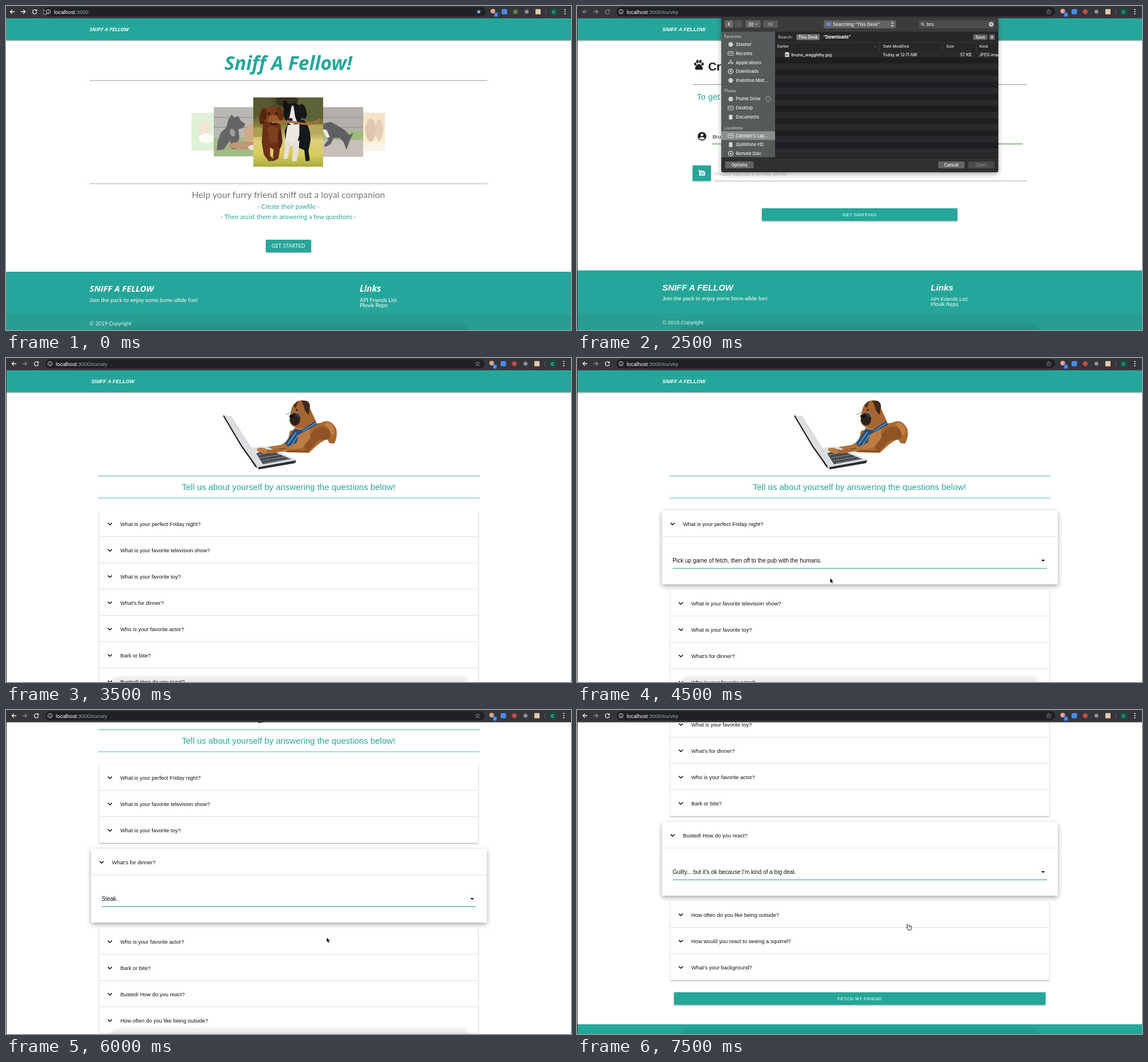
Animation, 987 px wide and 567 px high, one loop 8000 ms. Source, as an HTML page:

```html
<!DOCTYPE html>
<html lang="en">
<head>
<meta charset="utf-8">
<title>Sniff A Fellow</title>
<style>
html, body { margin: 0; width: 100%; height: 100%; overflow: hidden; background: #fff; }
#stage { display: block; width: 987px; height: 567px; font-family: "Liberation Sans", Arial, sans-serif; }
.lato { font-family: Lato, sans-serif; }
.lato .brand { font-family: "Open Sans", sans-serif; font-variant-ligatures: none; }
.mac { font-family: Inter, sans-serif; font-weight: 500; }
.brand { font-weight: 700; font-style: italic; }
.caps { letter-spacing: .35px; }
.low { filter: drop-shadow(0 1px 1.3px rgba(0,0,0,.36)); }
.high { filter: drop-shadow(0 3px 4px rgba(0,0,0,.34)); }
.blur { filter: blur(2.5px); }
</style>
</head>
<body>
<svg id="stage" viewBox="0 0 987 567"></svg>
<script>
const TEAL = '#26a69a', INK = '#212121';

// y of text is the middle of its capitals
const text = (s, x, y, size, fill = INK, more = '') =>
  `<text x="${x}" y="${y}" dy=".36em" font-size="${size}" fill="${fill}" ${more}>${s}</text>`;
const rect = (x, y, w, h, fill, more = '') =>
  `<rect x="${x}" y="${y}" width="${w}" height="${h}" fill="${fill}" ${more}/>`;
const dot = (x, y, r, fill, more = '') => `<circle cx="${x}" cy="${y}" r="${r}" fill="${fill}" ${more}/>`;
const oval = (x, y, rx, ry, fill, turn = 0) =>
  `<ellipse rx="${rx}" ry="${ry}" fill="${fill}" transform="translate(${x} ${y}) rotate(${turn})"/>`;
const shape = (d, fill, more = '') => `<path d="${d}" fill="${fill}" ${more}/>`;
const line = (d, color, w = 1, more = '') => shape(d, 'none', `stroke="${color}" stroke-width="${w}" ${more}`);
const at = (x, y, inner) => `<g transform="translate(${x} ${y})">${inner}</g>`;
const group = (cls, inner) => `<g class="${cls}">${inner}</g>`;
const MID = 'text-anchor="middle"', BRAND = 'class="brand"', BOLD = 'font-weight="700"';

const arrow = (x, y) => at(x, y, shape('M0 0V8.6L2 6.9 3.4 10 5 9.3 3.6 6.3H6.3Z', '#000', 'stroke="#fff" stroke-width=".6"'));
const hand = (x, y) => at(x, y, shape(
  'M-4-4.5Q-2.5-5.6-1.4-3.6L-.6-2.2 3-2Q4.8-1.6 4.6.6L4 3.4 3.4 5H-1.4L-2.4 3-4.4 1Q-4.6-.6-2.4.2Z',
  '#fff', 'stroke="#222" stroke-width="1"') + line('M.4-1.8V.6M2.2-1.8V.6', '#222', .7));

function chrome(path, dim) {
  const home = !path, l = home ? 0 : 3, r = home ? 0 : -2;
  const on = dim ? '#85888b' : '#f1f1f1';
  const back = (x, flip, c) => `<g transform="translate(${x} 10) scale(${flip} 1)">${line('M4 0H-3.6M0-3.6L-3.6 0 0 3.6', c, 1.3)}</g>`;
  return rect(0, 0, 987, 21.5, '#35363a') + rect(66 + l, 2, 772 + r - l, 16, '#202124', 'rx="8"') +
    back(11 + l, 1, on) + back(30 + l, -1, home ? on : '#85888b') +
    at(50 + l, 10, line('M3-2.2A3.7 3.7 0 1 0 3.7 1', on, 1.3) + shape('M4.2-4.4V-.8H.6Z', on)) +
    dot(74 + l, 10, 3.8, 'none', 'stroke="#ddd" stroke-width=".9"') + rect(73.5 + l, 9.4, 1, 3, '#ddd') + rect(73.5 + l, 7.6, 1, 1, '#ddd') +
    text(`localhost<tspan fill="#9aa0a6">:3000${path}</tspan>`, 84 + l, 10.3, 9.3, '#fff') +
    text(home ? '★' : '☆', 826 + r, 9.6, 12, home ? '#8ab4f8' : '#fff', MID + ' font-family="DejaVu Sans, sans-serif"') +
    dot(850.5 + r, 9, 4, '#e8a48f') + rect(852.5 + r, 11, 7, 8, '#2f6fe0', 'rx="1.5"') +
    text('1', 856 + r, 15.2, 6, '#fff', MID) +
    rect(866 + r, 5.5, 9.5, 9, '#4a8cf7', 'rx="2"') +
    dot(890 + r, 10, 4.2, home ? '#5f7d4e' : '#c0504a') + dot(909.5 + r, 10, 3.5, '#8d8f92') +
    rect(925 + r, 5.5, 9, 9, '#e9c9ad') + rect(942.5 + r, 5, 1, 10, '#5c5f63') +
    dot(957 + r, 10, 6.5, '#0d5548') + text('C', 957 + r, 10, 7.5, '#dfe', MID) +
    [6.3, 10, 13.7].map(y => dot(976.5 + r, y, 1.1, '#eee')).join('');
}

const nav = x => group('low', rect(0, 21, 987, 39, TEAL)) + text('SNIFF A FELLOW', x, 41, 9.1, '#fff', BRAND);
const button = (x, y, w, label, size = 8) =>
  group('low', rect(x, y, w, 22, TEAL, 'rx="1"')) + text(label, x + w / 2, y + 11, size, '#fff', MID + ' class="caps"');
const footer = (y, x, small) => rect(0, y, 987, 120, TEAL) + rect(0, y + 75, 987, 60, '#289d93') +
  text('SNIFF A FELLOW', x, y + 30, 14.9, '#fff', BRAND) + text('Links', 618, y + 30, 15.1, '#fff', BRAND) +
  text('Join the pack to enjoy some bone-afide fun!', x, y + 49, small + .4, '#fff') +
  text('API Friends List', 618, y + 49.6, small, '#fff') + text('Plovik Repo', 618, y + 58.6, small, '#fff') +
  text('© 2019 Copyright', x, y + 90.5, 9.2, '#e6f3f1');
const dock = rect(182, 557, 626, 30, '#000', 'rx="12" opacity=".07" class="blur"');
const edge = rect(0, 21, 1, 546, '#2b2f31');

const photo = (x, y, w, h, fade, inner) =>
  `<svg x="${x}" y="${y}" width="${w}" height="${h}" viewBox="0 0 100 100" preserveAspectRatio="none"><g opacity="${fade}">${inner}</g></svg>`;
const all = fill => rect(0, 0, 100, 100, fill);

function carousel() {
  const planks = [20, 40].map(y => rect(0, y, 100, 1.5, '#6e6a64')).join('');
  const farLeft = all('#a5dd92') + oval(34, 40, 15, 22, '#d9b98e', 20) + oval(40, 67, 20, 13, '#fff3e2') + oval(82, 48, 14, 24, '#e3d5b0');
  const farRight = all('#edcf7c') + rect(0, 0, 100, 45, '#e6b766') + oval(62, 45, 14, 30, '#a9672f') + oval(85, 45, 10, 28, '#b9793f') + rect(0, 78, 100, 22, '#f0e3c2');
  const left = all('#a09d98') + planks + rect(0, 62, 100, 38, '#7fa15a') +
    shape('M30 24L36 15 41 21 50 18 55 28 64 34 60 42 50 45 52 62 44 86 35 84 33 68 20 86 6 88 8 70 14 52 25 42Z', '#2a292d') +
    oval(38, 52, 5, 8, '#7c7a78', -20) + oval(80, 55, 19, 22, '#c08c58', 25) + oval(62, 78, 32, 8, '#a7733f') + oval(84, 82, 14, 6, '#e8d8bf');
  const right = all('#96928b') + planks + rect(0, 48, 100, 20, '#79a04c') + rect(0, 66, 100, 34, '#b3a79f') +
    shape('M14 40L22 32 34 30 46 36 62 46 72 56 80 52 74 64 70 74 66 86 60 70 52 62 40 62 34 74 24 80 20 77 29 66 25 56 14 49Z', '#232326') +
    shape('M16 44L26 46 32 60 26 62 20 52Z', '#e5e2df');
  const main = all('url(#meadow)') + oval(8, 8, 18, 18, '#58592e') + oval(84, 14, 24, 20, '#5e6238') +
    oval(48, 5, 16, 9, '#34331f') + oval(92, 46, 24, 7, '#b5aa5c') + oval(6, 50, 12, 7, '#aaa050') +
    shape('M14 36Q27 28 39 40L42 64 38 74 36 88 28 92 29 75 24 72 24 84 31 91 22 92 15 82 12 64Z', '#6a3117') +
    shape('M20 44Q28 38 36 46L35 64 24 66Z', '#7d3f1e') + oval(38, 60, 3, 13, '#51230f') +
    oval(27, 25, 13, 12, '#7c3d1d') + oval(14, 27, 5, 12, '#57270f', 12) + oval(38, 24, 4.5, 11, '#67300f', -12) +
    oval(29, 32, 8, 6, '#9b5a2c') + oval(29, 37, 5, 3, '#3b180c') +
    shape('M50 36L72 32Q82 42 82 62L79 77 81 91 75 92 73 76 64 72 62 66 46 62 45 48Z', '#17181c') +
    shape('M49 40L66 38 66 54 62 68 54 70 46 60Z', '#ece8e1') +
    shape('M45 60L54 64 51 78 49 88 43 89 45 75ZM56 64L66 62 65 78 62 92 55 92 57 78Z', '#e6e0d6') +
    oval(57, 23, 14, 15, '#15161a') + oval(47, 13, 4, 9, '#111', -15) + oval(71, 20, 5, 11, '#17181c', -15) +
    shape('M55 12H57.5L60 28 63 36 55 40 48 35 52 28Z', '#eee9e4') + oval(53, 32, 3.4, 2.4, '#222') +
    line('M26 36Q46 33 66 37T95 31', '#a5703c', 3) + dot(22.5, 23, 1.5, '#1e1008') + dot(33, 23, 1.5, '#1e1008');
  return photo(324, 187, 66, 66, .36, farLeft) + photo(596, 187, 66, 67, .36, farRight) +
    rect(363, 177, 261, 87, '#fff') + photo(363, 177, 86, 86, .72, left) + photo(538, 177, 86, 87, .72, right) +
    photo(432, 160, 122, 121.5, 1, main);
}

const home = () => `<defs><linearGradient id="meadow" x2="0" y2="1"><stop offset=".2" stop-color="#4f4f2b"/><stop offset=".42" stop-color="#8a843c"/>
  <stop offset=".62" stop-color="#dfce7c"/><stop offset=".82" stop-color="#d8cc5f"/><stop offset="1" stop-color="#a8ab3c"/></linearGradient></defs>` +
  group('lato', nav(146) + text('Sniff A Fellow!', 493, 99.5, 33.6, TEAL, MID + ' ' + BRAND) +
    rect(146, 130, 695, 1, '#a0a0a0') + rect(146, 310.5, 695, 1, '#a0a0a0') + carousel() +
    text('Help your furry friend sniff out a loyal companion', 493.3, 330, 15.7, '#777', MID) +
    text('- Create their pawfile -', 493.3, 351, 11, TEAL, MID) +
    text('- Then assist them in answering a few questions -', 493.3, 368.7, 11, TEAL, MID) +
    button(454, 409, 79, 'GET STARTED', 8.6) + footer(465, 146, 9.5)) + dock + chrome('') + arrow(66, 6);

const paw = x => at(x, 103, oval(-6.3, -1.2, 2.1, 2.7, INK, -25) + oval(-2.6, -5.8, 2.2, 2.9, INK) +
  oval(2.6, -5.8, 2.2, 2.9, INK) + oval(6.3, -1.2, 2.1, 2.7, INK, 25) +
  shape('M0-1.4C3-1.4 4 1.5 5.8 3.5C8.4 6.5 6 9.4 3.2 8.7Q0 7.8-3.2 8.7C-6 9.4-8.4 6.5-5.8 3.5C-4 1.5-3-1.4 0-1.4Z', INK));

function field(x, w, value, hint, state) {
  const color = { idle: '#cfcfcf', focus: TEAL, done: '#4caf50' }[state];
  return text(value || hint, x + .7, 228.3, 9.6, value ? INK : '#c6c6c6') + rect(x, 240.7, w, state == 'idle' ? 1.8 : 1.4, color);
}

function survey(first, last, dialog = '') {
  const state = (value, next) => next ? 'done' : value ? 'focus' : 'idle';
  return nav(149) + paw(213) + paw(406) + text('Create A Pawfile', 229, 105.5, 20.6, INK, BOLD) +
    rect(202, 137, 584, 1, '#8f8f8f') +
    text('To get started please answer the details below.', 209, 158.3, 14.95, TEAL) +
    dot(218.4, 228, 7.6, '#1b1b1b') + dot(218.4, 225.6, 2.4, '#fff') + oval(218.4, 231.6, 4.5, 2.1, '#fff') +
    field(236, 251.5, first, 'First Name', state(first, last)) + field(500.5, 278, last, 'Last Name', state(last, dialog)) +
    text("We'll never share your Last Name with anyone else.", 501, 250.3, 7.5, '#757575') +
    group('low', rect(202, 279, 32, 27, TEAL, 'rx="1"')) +
    rect(213.5, 289.3, 10, 7.8, '#fff', 'rx="1"') + rect(216, 288, 5, 2, '#fff') + dot(218.6, 293.2, 2.6, TEAL) + dot(218.6, 293.2, 1.5, '#fff') +
    line('M213.5 286.2V290M211.6 288.1H215.4', '#fff', 1) +
    text('Please upload a profile photo', 240, 293.2, 9.8, '#c6c6c6') + rect(240, 305.7, 546, 1, '#a8a8a8') +
    button(323, 354, 341.5, 'GET SNIFFING') + footer(462.7, 149, 9.1) + dock + edge + chrome('/survey', dialog) + dialog;
}

function picker(query, chosen) {
  const side = (s, y, icon) => icon(268.5, y) + text(s, 277.5, y, 7.5, '#f2f2f2');
  const head = (s, y) => text(s, 257, y, 6.9, '#c9cbcb');
  const pill = (x, y, w, h, fill) => rect(x, y, w, h, fill, 'rx="2"');
  const ball = (x, y) => dot(x, y, 4, 'none', 'stroke="#ddd" stroke-width="1.4"') + dot(x, y, 1.4, '#ddd');
  const box = (x, y) => rect(x - 4.5, y - 3.3, 9, 6.6, 'none', 'stroke="#ddd" rx="1"') + rect(x - 3, y - 1, 6, 1, '#ddd');
  const doc = (x, y) => rect(x - 3, y - 4, 6, 8, '#ddd', 'rx=".5"');
  const plain = (x, y) => dot(x, y, 4, '#d0d2d2');
  const tri = (x, y) => line(`M${x - 4} ${y + 3}L${x} ${y - 4} ${x + 4} ${y + 3}M${x - 5} ${y + 1}H${x + 5}`, '#ddd', 1.1);
  let rows = '';
  for (let y = 79.5, i = 0; y < 250; y += 10.6, i++)
    rows += rect(346, y, 390, Math.min(10.6, 251 - y), i % 2 ? '#1e1e20' : '#29292c');
  const file = 'bruno_waggleby.jpg';
  return group('mac', group('high', rect(252, 18, 484, 273, '#303033', 'rx="3"')) + rect(252, 20, 484, 25, '#3b3b3e') +
    rect(252, 45, 94, 220, '#565a5b') + rect(346, 45, 390, 34.5, '#262629') + rect(346, 63.5, 390, .8, '#3e3e41') + rows +
    pill(258, 25, 15, 13, '#68686b') + pill(274.5, 25, 15, 13, '#515154') + pill(294, 25, 27, 13, '#636366') + pill(325, 25, 26, 13, '#58585b') +
    line('M267 28.7L264.3 31.6 267 34.5', '#fff', 1.2) + line('M281 28.7L283.7 31.6 281 34.5', '#777', 1.2) +
    line('M300 29.5H308M300 32H308M300 34.5H308', '#ddd', 1.4, 'stroke-dasharray="2 1"') + line('M311.5 30.7L313.5 32.7 315.5 30.7', '#ddd') +
    rect(333, 29, 9, 6, '#7c7c7f') +
    pill(431, 25, 126, 14, '#636366') + rect(435.5, 28.5, 8, 6.5, '#7186c9', 'rx="1"') + text('Searching “This Desk”', 447, 32, 7.6, '#f2f2f2') +
    line('M549 30.6L551 28.6 553 30.6M549 33.4L551 35.4 553 33.4', '#eee', 1.1) +
    pill(597, 25, 133, 14, '#4c4c4f') + dot(603.5, 31.3, 2.3, 'none', 'stroke="#ddd"') + line('M605.2 33L607.5 35.3', '#ddd') +
    text(query, 611, 32, 7.6, '#f2f2f2') + dot(723.5, 32, 4, '#d0d0d0') + line('M722 30.5L725 33.5M725 30.5L722 33.5', '#444') +
    text('Search:', 351, 54.6, 7.2, '#c6c6c8') + pill(383, 49.3, 41, 10.5, '#707073') + text('This Desk', 403.5, 54.7, 7.2, '#fff', MID) +
    text('“Downloads”', 430, 54.7, 7.4, '#fff', BOLD) +
    pill(692, 49.5, 25, 10, '#626265') + text('Save', 704.5, 54.6, 7.2, '#fff', MID) + pill(720, 49.5, 10, 10, '#626265') + line('M722.5 54.5H727.5M725 52V57', '#fff') +
    text('Earlier', 350, 71, 6.6, '#e6e6e6') + line('M519 72L520.8 70 522.6 72', '#999', .8) + text('Date Modified', 535, 71, 6.7, '#e6e6e6') +
    text('Size', 645, 71, 6.7, '#e6e6e6') + text('Kind', 703, 71, 6.7, '#e6e6e6') +
    [527.5, 638, 697].map(x => rect(x, 66, .8, 11, '#4a4a4d')).join('') +
    (chosen ? rect(346, 79.7, 390, 10.8, '#8a2f8e') : '') + rect(363.5, 81, 7, 8.2, '#dfe6e0') + rect(364.5, 84, 4, 3.5, '#6f8f78') +
    text(file, 374.5, 85.2, 7.3, '#fff') + text('Today at 12:11 AM', 534, 85.2, 7.1, '#eee') +
    text('57 KB', 689, 85.2, 7.1, '#eee', 'text-anchor="end"') +
    `<svg x="700" y="79" width="36" height="13">${text('JPEG image', 2.5, 6.2, 7.1, '#eee')}</svg>` +
    rect(346, 251, 390, 14, '#2a2a2d') +
    (chosen ? shape('M354.5 258.5L358 254.5 361.5 258.5V262H354.5Z', '#d9b9a0') + text('carmen', 364.5, 258.2, 6.7, '#a4a4a7') +
      text('›', 388.5, 257.6, 8, '#ccc') + rect(393, 255.3, 8, 6, '#4aa3dd') + text('Downloads', 403, 258.2, 6.7, '#a4a4a7') +
      text('›', 441.5, 257.6, 8, '#ccc') + rect(448, 254, 6, 8, '#ddd') + text(file, 457.5, 258.2, 6.8, '#a4a4a7') : '') +
    rect(252, 219.3, 94, 15, '#8c8f90') + head('Favorites', 54) + head('Plume', 149) + head('Locations', 213.5) +
    side('Stashel', 67.3, plain) + side('Recents', 83, box) + side('Applications', 98.8, tri) + side('Downloads', 114.5, ball) +
    side('Inventive Mist...', 130.2, plain) + side('Plume Drive', 162.7, plain) + dot(334, 162.5, 4.2, 'none', 'stroke="#bbb" stroke-width=".9"') +
    side('Desktop', 178.6, box) + side('Documents', 194.4, doc) + side("Carmen's Lap...", 227, box) + side('Quillstone HD', 242.7, doc) + side('Remote Disc', 258.3, ball) +
    rect(252, 265, 484, 1, '#1d1d1f') + pill(258.5, 272, 50, 12, '#646467') + text('Options', 283.5, 278, 7.7, '#fff', MID) +
    pill(631, 272, 46, 12, '#646467') + text('Cancel', 654, 278, 7.7, '#fff', MID) +
    pill(683, 272, 46, 12, chosen ? '#8a2f8e' : '#4a4a4d') + text('Open', 706, 278, 7.7, chosen ? '#fff' : '#888', MID)) +
    (chosen ? arrow(719, 280) : '');
}

const laptopDog = () =>
  shape('M532 114Q546 116 556 111Q569 108 577 124Q580 138 573 150L565 149 561 142Q549 147 541 155L529 166 488 165 496 128Z', '#a9662f') +
  shape('M543 122Q556 116 566 128Q571 138 560 143Q546 140 538 152L528 164 521 158Q526 136 543 122Z', '#8f5325') +
  shape('M561 113Q573 114 574 130L568 136Q566 122 555 116Z', '#c07f45') +
  shape('M504 122L530 116 532 140 516 158 492 160Z', '#bd7c42') +
  shape('M500 140L508 148 491 163 444 168Q436 163 443 158L480 152Z', '#b47238') +
  line('M444 164L488 158M492 163L528 163', '#71431e', 1.6) +
  shape('M497 98Q499 76 516 74Q529 74 531 88L541 110Q534 124 514 123Q498 122 495 110Z', '#a6642f') +
  shape('M516 75Q530 72 531 84L529 99Q522 95 520 84Z', '#41281a') + shape('M502 83L511 74 506 88Z', '#4a2d1b') +
  oval(505, 107, 9, 11, '#2a211e') + oval(499, 102, 4, 3, '#111') + dot(508, 91, 1.6, '#1a120c') +
  line('M488 99L499 95 514 98 520 93', '#777', .9) + dot(511, 98, 4, 'none', 'stroke="#777" stroke-width=".8"') +
  shape('M504 124L516 126 541 110 543 117 517 131 511 135 508 148 492 155 487 149 498 134Z', '#25517c') +
  line('M492 151L507 130M499 152L511 134M518 128L541 114', '#7fa6c9', 1.3) +
  shape('M379 100L392 102 440 176 441 193 436 191Z', '#dcdee0') + shape('M379 100L382 101 439 189 440 193 435 190Z', '#1d1f22') +
  line('M392 102L439 175', '#8b8f93', 1) +
  shape('M412 158L455 155 507 178 505 182 441 194Z', '#dddfe1') + shape('M379 100L412 158 441 194 440 176 392 102 379 100Z', '#dcdee0') +
  line('M380 101L412 155 437 190', '#1d1f22', 2.2) + shape('M437 167L458 160 498 177 449 186Z', '#45494d') +
  line('M440 170L468 164M444 175L478 169M448 180L488 173M452 184L494 177', '#b9bcbe', .9, 'stroke-dasharray="3 1"') +
  shape('M441 191L507 179 505 184 441 195Z', '#2b2e31') +
  oval(449, 162, 11, 4.5, '#bd7c42', 12) + oval(468, 163, 13, 3.5, '#aa6930', -8);

const questions = ['What is your perfect Friday night?', 'What is your favorite television show?', 'What is your favorite toy?',
  'What’s for dinner?', 'Who is your favorite actor?', 'Bark or bite?', 'Busted! How do you react?',
  'How often do you like being outside?', 'How would you react to seeing a squirrel?', 'What’s your background?'];

function quiz(open, scroll, answer, pointer) {
  let y = 267, list = '';
  questions.forEach((q, i) => {
    const on = i == open;
    if (on && i) y += 10;
    const x = on ? 148.5 : 163, w = on ? 691.5 : 662;
    list += group(on ? 'high' : 'low', rect(x, y, w, on ? 129 : 46, '#fff')) + rect(x, y + 45.3, w, .9, '#ddd') +
      line(`M${x + 15} ${y + 21.6}l3.5 3.4 3.5-3.4`, '#111', 1.5) + text(q, x + 36.7, y + 23.2, 9.4, '#111');
    if (on) list += text(answer, 167, y + 87.2, 10, '#111') + rect(167, y + 100.6, 654, 1.1, TEAL) +
      shape(`M811 ${y + 86}h6.4l-3.2 3.2z`, '#111');
    y += on ? 139 : 46;
  });
  const page = nav(149) + laptopDog() + rect(161, 206, 666.5, 1, '#4db6ac') + rect(161, 244.6, 666.5, 1, '#4db6ac') +
    text('Tell us about yourself by answering the questions below!', 493.5, 226, 14.95, TEAL, MID) +
    list + button(169.5, y + 21, 649, 'FETCH MY FRIEND') + footer(y + 77, 149, 9.1);
  return at(0, -scroll, page) + dock + edge + chrome('/survey') + pointer;
}

// one entry per half second
const STEP = 500, scenes = [
  home, home,
  () => survey('', ''),
  () => survey('Bruno', ''),
  () => survey('Bruno', 'Waggleby'),
  () => survey('Bruno', 'Waggleby', picker('bru', false)),
  () => survey('Bruno', 'Waggleby', picker('bruno_wa', true)),
  () => quiz(-1, 0, '', ''),
  () => quiz(0, 0, 'Choose your option', arrow(442, 360)),
  () => quiz(0, 0, 'Pick up game of fetch, then off to the pub with the humans.', arrow(442, 385)),
  () => quiz(1, 0, 'Anything with squirrels.', arrow(500, 440)),
  () => quiz(2, 86, 'Tennis Balls.', arrow(560, 394)),
  () => quiz(3, 172, 'Steak.', arrow(560, 398)),
  () => quiz(4, 257, 'The one with the stick.', arrow(560, 386)),
  () => quiz(5, 257, 'Bark.', hand(563, 415)),
  () => quiz(6, 357, "Guilty... but it's ok because I'm kind of a big deal.", hand(580, 380)),
];

const stage = document.getElementById('stage');
let shown = -1;
function tick() {
  const now = Math.floor(performance.now() / STEP) % scenes.length;
  if (now != shown) stage.innerHTML = scenes[shown = now]();
  requestAnimationFrame(tick);
}
tick();
</script>
</body>
</html>
```
